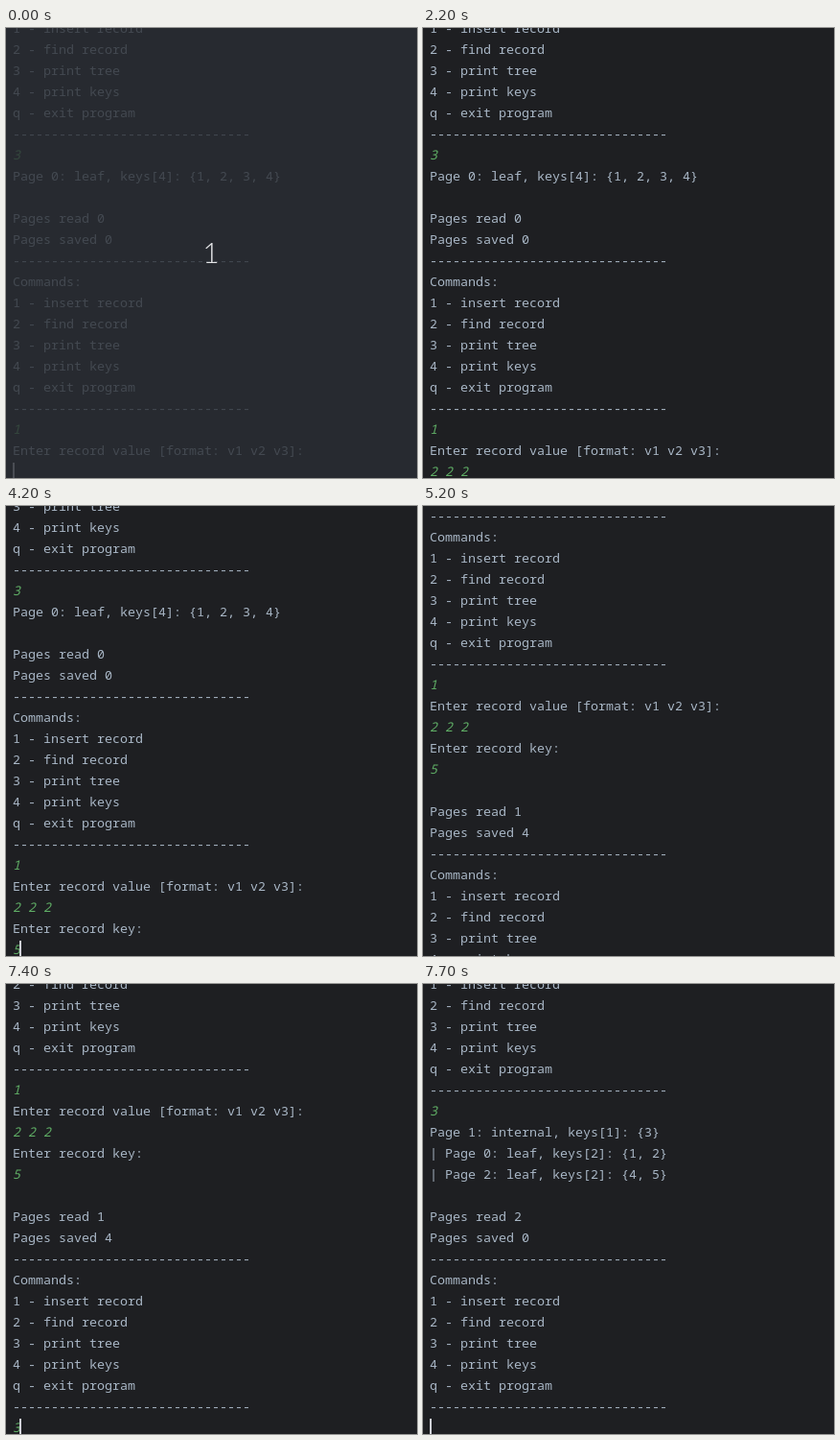
These frames come from a looping animation (429x469 px, 8000 ms). An HTML page with a canvas:

```html
<!DOCTYPE html>
<html>
<head>
<meta charset="utf-8">
<style>
html, body { margin: 0; height: 100%; overflow: hidden; background: #1e1f22; }
canvas { display: block; }
</style>
</head>
<body>
<canvas id="stage" width="429" height="469"></canvas>
<script>
const ctx = document.getElementById('stage').getContext('2d');
const LOOP = 8000, ROW = 22, CHAR = 8, LEFT = 7;
const FONT = '13.333px "Noto Sans Mono", monospace';

const rule = '-'.repeat(31);
const options = ['1 - insert record', '2 - find record', '3 - print tree',
  '4 - print keys', 'q - exit program', rule];
const report = (read, saved) =>
  ['', `Pages read ${read}`, `Pages saved ${saved}`, rule, 'Commands:', ...options];

const lines = [
  ...options, '3',
  'Page 0: leaf, keys[4]: {1, 2, 3, 4}', ...report(0, 0), '1',
  'Enter record value [format: v1 v2 v3]:', '2 2 2',
  'Enter record key:', '5', ...report(1, 4), '3',
  'Page 1: internal, keys[1]: {3}',
  '| Page 0: leaf, keys[2]: {1, 2}',
  '| Page 2: leaf, keys[2]: {4, 5}', ...report(2, 0)
];

// [start ms, scroll px, input row, typed text, caret shown]
const steps = [
  [0, 0, 21, '', 1], [700, 0, 21, '', 0],
  [800, 0, 21, '2', 1], [900, 0, 21, '2 ', 1], [1000, 0, 21, '2 2', 1],
  [1200, 0, 21, '2 2 ', 1], [1400, 0, 21, '2 2 2', 1],
  [2200, 0, 21, '2 2 2', 0], [2900, 0, 21, '2 2 2', 1],
  [3100, 22, 23, '', 0], [3200, 44, 23, '', 1], [3700, 44, 23, '', 0],
  [4200, 44, 23, '5', 1], [4700, 44, 23, '5', 0],
  [4900, 66, 24, '', 1], [5200, 232, 35, '', 0], [5300, 308, 35, '', 1],
  [6200, 308, 35, '', 0], [6900, 308, 35, '', 1], [7200, 308, 35, '', 0],
  [7400, 308, 35, '3', 1], [7500, 330, 36, '', 1],
  [7600, 540, 50, '', 0], [7700, 638, 50, '', 1]
];

function drawLine(text, y) {
  const isInput = /^\d[\d ]*$/.test(text);
  ctx.font = (isInput ? 'italic ' : '') + FONT;
  ctx.fillStyle = isInput ? '#5fad65' : '#a9b7c6';
  ctx.fillText(text, LEFT, y + 5);
}

function drawCountdown() {
  ctx.fillStyle = 'rgba(42, 45, 52, 0.8)';
  ctx.fillRect(0, 0, 429, 469);
  ctx.fillStyle = '#e4e5e7';
  ctx.font = '300 30px Lato, sans-serif';
  ctx.textAlign = 'center';
  ctx.fillText('1', 214, 245);
  ctx.textAlign = 'left';
}

function draw(now) {
  const time = now % LOOP;
  const [, scroll, row, typed, caret] = steps.findLast(step => step[0] <= time);
  const rowY = i => i * ROW - scroll;

  ctx.fillStyle = '#1e1f22';
  ctx.fillRect(0, 0, 429, 469);
  lines.slice(0, row).forEach((text, i) => drawLine(text, rowY(i)));
  drawLine(typed, rowY(row));
  if (caret) {
    ctx.fillStyle = '#ced0d6';
    ctx.fillRect(Math.max(LEFT, LEFT - 1 + typed.length * CHAR), rowY(row) - 9, 2, 18);
  }
  if (time < 100) drawCountdown();
}

const start = performance.now();
function tick() {
  draw(performance.now() - start);
  requestAnimationFrame(tick);
}
tick();
</script>
</body>
</html>
```
